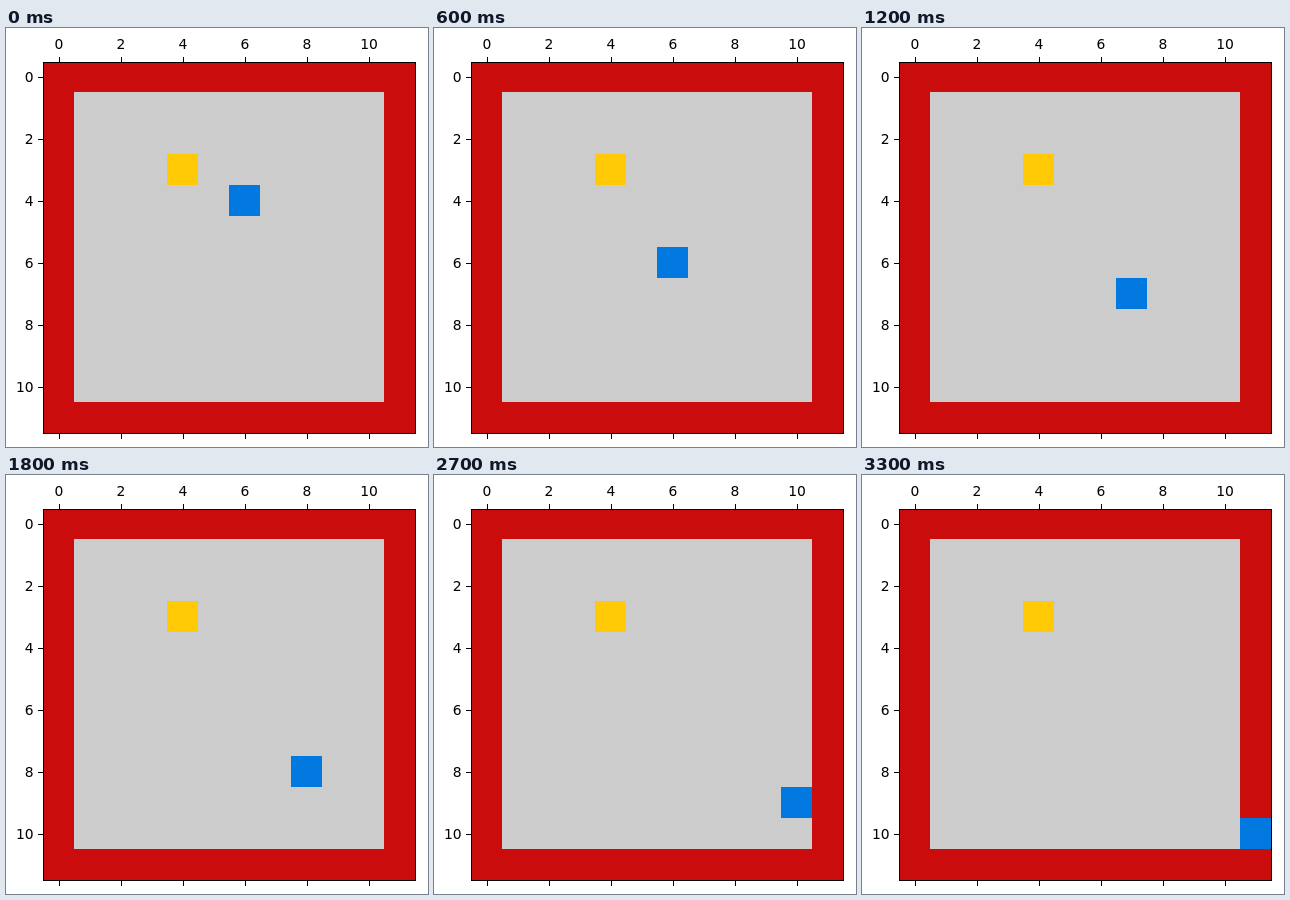
Recreate the animation shown at these times as an HTML page. Size 422 px wide and 419 px high, loop 3600 ms.

```html
<!DOCTYPE html>
<html lang="en">
<head>
<meta charset="utf-8">
<title>Grid walk</title>
<style>
  html, body { margin: 0; width: 100%; height: 100%; overflow: hidden; background: #fff; }
  svg { display: block; width: 422px; height: 419px; }
  text { font: 13.89px "DejaVu Sans", sans-serif; }
  .wall { fill: #cb0c0d; }
  .floor { fill: #ccc; }
  .goal { fill: #ffc905; }
  .walker { fill: #0078df; animation: walk 3.6s step-end infinite; }

  /* one cell (31px) every 300ms */
  @keyframes walk {
    0%       { transform: translate(186px, 124px); }
    8.3333%  { transform: translate(186px, 155px); }
    16.6666% { transform: translate(186px, 186px); }
    25%      { transform: translate(217px, 186px); }
    33.3333% { transform: translate(217px, 217px); }
    41.6666% { transform: translate(248px, 217px); }
    50%      { transform: translate(248px, 248px); }
    58.3333% { transform: translate(279px, 248px); }
    66.6666% { transform: translate(279px, 279px); }
    75%      { transform: translate(310px, 279px); }
    83.3333% { transform: translate(310px, 310px); }
    91.6666%, 100% { transform: translate(341px, 310px); }
  }
</style>
</head>
<body>
<svg viewBox="0 0 422 419" shape-rendering="crispEdges">
  <rect class="wall" x="37" y="34" width="372" height="371"/>
  <rect class="floor" x="68" y="64" width="310" height="310"/>
  <rect class="goal" x="161" y="126" width="31" height="31"/>
  <rect class="walker" x="37" y="33" width="31" height="31"/>
  <rect x="37.5" y="34.5" width="372" height="371" fill="none" stroke="#000"/>
  <g id="axes"></g>
</svg>
<script>
  const axes = document.getElementById("axes");

  function add(tag, attributes, content = "") {
    const node = document.createElementNS("http://www.w3.org/2000/svg", tag);
    for (const [key, value] of Object.entries(attributes)) node.setAttribute(key, value);
    node.textContent = content;
    axes.append(node);
  }

  for (let n = 0; n <= 10; n += 2) {
    const x = 53 + n * 31;
    const y = 49 + n * 31;
    add("rect", { x, y: 29, width: 1, height: 5 });
    add("rect", { x, y: 406, width: 1, height: 5 });
    add("rect", { x: 32, y, width: 5, height: 1 });
    add("text", { x, y: 21, "text-anchor": "middle" }, n);
    add("text", { x: 27.7, y: y + 5, "text-anchor": "end" }, n);
  }
</script>
</body>
</html>
```
